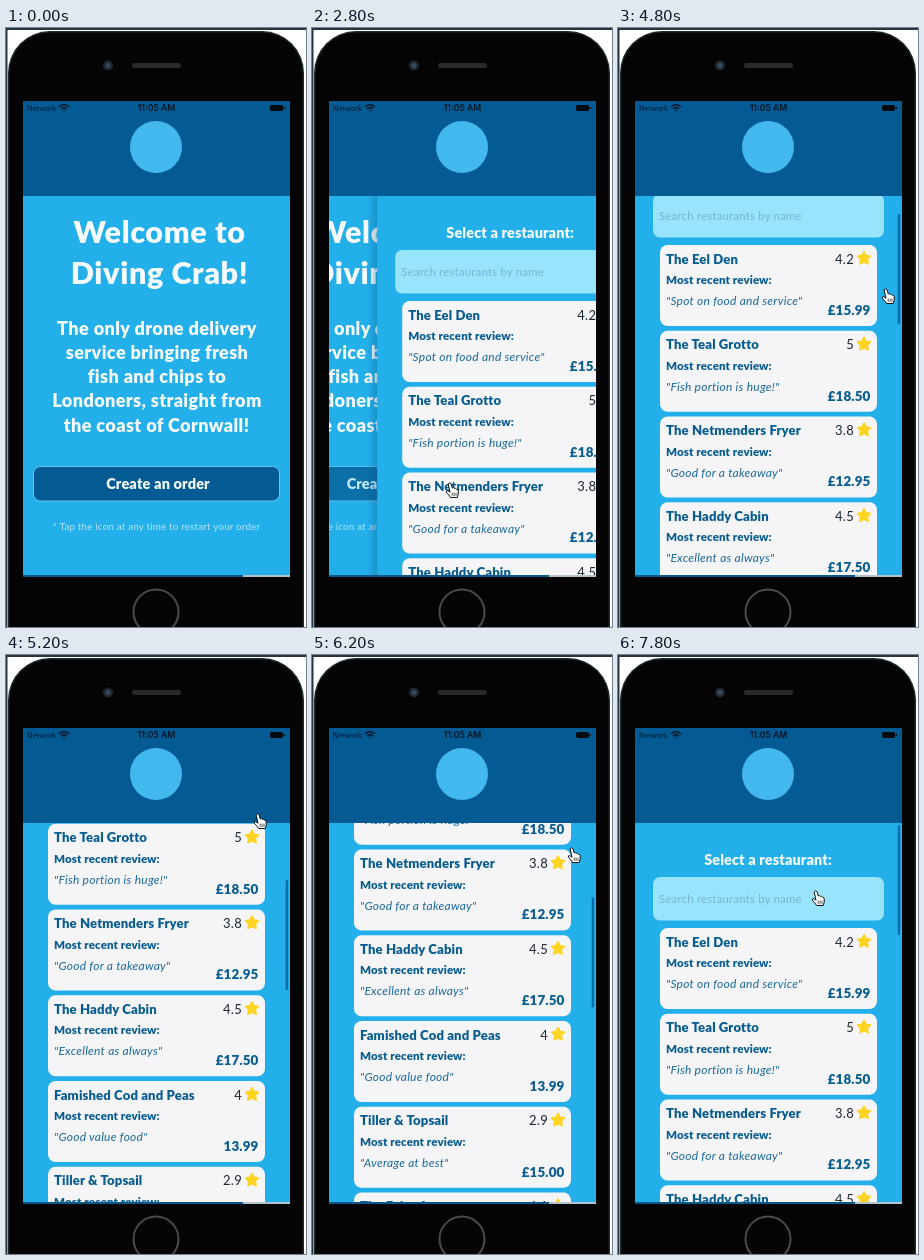
An HTML page that plays this animation: 300x599 px, repeating every 8000 ms.

```html
<!DOCTYPE html>
<html lang="en">
<head>
<meta charset="utf-8">
<title>Fish and chips order</title>
<style>
  html, body { margin: 0; width: 100%; height: 100%; overflow: hidden; background: #fff; }
  svg { display: block; width: 100%; height: 100%; }
  text { font-family: Lato, "Open Sans", sans-serif; letter-spacing: .02em; }
  .bold { font-weight: 900; letter-spacing: .01em; }
  .light { fill: #f6fbff; }
  .status { font-family: Inter, Roboto, sans-serif; font-size: 7.2px; letter-spacing: 0; fill: #06182a; }
  .mid { text-anchor: middle; }
  .end { text-anchor: end; }
  .h1 { font-size: 30.5px; }
  .lead { font-size: 18.1px; }
  .name { font-size: 13.1px; fill: #075c90; }
  .label { font-size: 11.5px; fill: #075c90; }
  .quote { font-size: 12px; font-style: italic; fill: #1a6a9c; }
  .price { font-size: 13.4px; fill: #075c90; }
  .rate { font-size: 13px; fill: #1c2630; }
</style>
</head>
<body>
<svg viewBox="0 0 300 599" preserveAspectRatio="none">
  <defs>
    <clipPath id="view"><rect x="17" y="168" width="267" height="379.5"/></clipPath>
    <linearGradient id="shade">
      <stop offset="0" stop-color="#04507f" stop-opacity="0"/>
      <stop offset="1" stop-color="#04507f" stop-opacity=".3"/>
    </linearGradient>
  </defs>

  <rect width="300" height="599" fill="#fff"/>
  <path d="M0 0H300V2H0Z" fill="#2a343f"/>
  <path d="M0 2H1.5V599H0Z" fill="#283541"/>
  <rect x="2" y="3" width="296" height="660" rx="42" fill="#1f2a2e"/>
  <rect x="3.4" y="4.4" width="293.2" height="657" rx="40.6" fill="#040405"/>
  <circle cx="102" cy="37.5" r="5" fill="#20272e"/>
  <circle cx="102" cy="37.5" r="2.6" fill="#34495c"/>
  <rect x="126" y="35" width="49" height="5" rx="2.5" fill="#2c2929"/>
  <circle cx="150" cy="584" r="22.5" fill="#050506" stroke="#4b4b4d" stroke-width="2"/>

  <rect x="17" y="73" width="267" height="476" fill="#23afea"/>
  <g clip-path="url(#view)">
    <g id="welcome">
      <g id="hello" class="bold light mid"></g>
      <g id="button">
        <rect x="27.5" y="438.5" width="246" height="34.5" rx="7" fill="#045a93" stroke="#6cc3ee"/>
        <text class="bold light mid" x="152" y="460.5" font-size="14.5">Create an order</text>
      </g>
      <text class="mid" x="150.5" y="501.5" font-size="9.8" fill="#b5e4fa">* Tap the icon at any time to restart your order</text>
    </g>
    <g id="shop">
      <rect x="7" y="168" width="10" height="380" fill="url(#shade)"/>
      <rect x="17" y="168" width="267" height="380" fill="#23afea"/>
      <g id="list">
        <text class="bold light mid" x="150" y="210" font-size="14.4">Select a restaurant:</text>
        <rect x="35" y="222" width="231" height="43.5" rx="7" fill="#98e4fc"/>
        <text x="41" y="248" font-size="11.35" fill="#76b5cf">Search restaurants by name</text>
      </g>
      <rect id="bar" x="279.7" width="2.4" rx="1.2" fill="#0a6ca6"/>
    </g>
  </g>

  <rect x="17" y="73" width="267" height="95" fill="#045a93"/>
  <circle cx="150" cy="119" r="26" fill="#43b8ef"/>
  <text class="status" x="21" y="83">Network</text>
  <g fill="none" stroke="#06182a" stroke-width="1.5">
    <path d="M53 79Q58 74.5 63 79M55 81Q58 78.2 61 81"/>
    <path d="M57.2 82.6H58.8"/>
  </g>
  <text class="status mid" x="150.5" y="83" font-weight="600" style="font-size:8.7px">11:05 AM</text>
  <rect x="264" y="77" width="13" height="6" rx="1.6" fill="#020a12"/>
  <rect x="277.7" y="79" width="1.2" height="2" fill="#020a12"/>
  <path d="M17 547H237V549H17Z" fill="#07598c"/>
  <path d="M237 547H284V549H237Z" fill="#b4c3cc"/>

  <path id="arrow" d="M0 0V13.5L3.2 10.6L5.3 15.6L7.8 14.5L5.7 9.7H10Z" fill="#050505" stroke="#fff" stroke-width="1"/>
  <g id="hand" stroke="#101010" stroke-linejoin="round" stroke-linecap="round">
    <path d="M-3.6 -6.4Q-2.2 -8.2 -.9 -6.2L.3 -2Q1.5 -3 2.5 -1.6Q3.7 -2.2 4.5 -.8Q6 -1 6.2 .8Q6.8 4 5.2 7.5H-1.4Q-3.2 4.6 -5.6 2.2Q-6 .4 -4.2 .6L-2.3 2Z" fill="#fff"/>
    <path d="M.2 3V5.5M2.1 3V5.5M4 3V5.5" fill="none" stroke-width=".7"/>
  </g>
</svg>
<script>
const LOOP = 8000, STEP = 200, ROW = 85.75;
const $ = id => document.getElementById(id);
const clamp = v => Math.min(1, Math.max(0, v));

function add(parent, tag, attrs, content = '') {
  const el = document.createElementNS('http://www.w3.org/2000/svg', tag);
  for (const k in attrs) el.setAttribute(k, attrs[k]);
  el.textContent = content;
  parent.append(el);
  return el;
}
const text = (parent, cls, x, y, str) => add(parent, 'text', { class: cls, x, y }, str);

['Welcome to', 'Diving Crab!'].forEach((s, i) => text($('hello'), 'h1', 153.5, 215 + i * 40.5, s));
['The only drone delivery', 'service bringing fresh', 'fish and chips to',
 'Londoners, straight from', 'the coast of Cornwall!']
  .forEach((s, i) => text($('hello'), 'lead', i < 4 ? 151 : 150.5, 306.5 + i * 24.3, s));

const star = Array.from({ length: 10 }, (_, i) => {
  const a = i * Math.PI / 5, r = i % 2 ? 3.9 : 7.4;
  return [r * Math.sin(a), -r * Math.cos(a)].map(v => v.toFixed(2));
}).join(' ');

[
  ['The Eel Den', '4.2', 'Spot on food and service', '£15.99'],
  ['The Teal Grotto', '5', 'Fish portion is huge!', '£18.50'],
  ['The Netmenders Fryer', '3.8', 'Good for a takeaway', '£12.95'],
  ['The Haddy Cabin', '4.5', 'Excellent as always', '£17.50'],
  ['Famished Cod and Peas', '4', 'Good value food', '13.99'],
  ['Tiller & Topsail', '2.9', 'Average at best', '£15.00'],
  ['The Brine Lantern', '4.1', 'Tasty and quick', '£14.50']
].forEach(([name, rate, quote, price], i) => {
  const g = add($('list'), 'g', { transform: `translate(42 ${273 + i * ROW})` });
  add(g, 'rect', { width: 217, height: 81, rx: 7.5, fill: '#f5f4f6' });
  text(g, 'bold name', 6, 18.5, name);
  text(g, 'bold label', 6, 39, 'Most recent review:');
  text(g, 'quote', 6, 60, `"${quote}"`);
  text(g, 'rate end', 194, 18.5, rate);
  text(g, 'bold price end', 210.5, 69.8, price);
  add(g, 'polygon', { points: star, transform: 'translate(204 13.4)', fill: '#fdd422',
    stroke: '#fdd422', 'stroke-linejoin': 'round' });
});

// Each key is [time, ...values]; values run linearly between keys.
const pointerKeys = [
  [1000, 205, 545], [1400, 139, 459], [2800, 140, 462], [3400, 140, 462], [4200, 268, 332],
  [4400, 270, 324], [4800, 270, 268], [5000, 262, 200], [5200, 254, 166], [5600, 253, 164],
  [6200, 262, 200], [7000, 280, 468], [7200, 278, 462], [7800, 200, 243]
];
const scrollKeys = [
  [4400, 0], [4800, 56], [5000, 126], [5200, 190], [5400, 230], [5600, 248],
  [6200, 250], [7000, -20], [7200, -8], [7400, 0]
];

function track(keys, t) {
  if (t <= keys[0][0]) return keys[0].slice(1);
  const i = keys.findIndex(k => k[0] >= t);
  if (i < 0) return keys[keys.length - 1].slice(1);
  const a = keys[i - 1], b = keys[i], p = (t - a[0]) / (b[0] - a[0]);
  return a.slice(1).map((v, j) => v + (b[j + 1] - v) * p);
}

function move(id, x, y) { $(id).setAttribute('transform', `translate(${x} ${y})`); }
function show(id, on) { $(id).style.display = on ? '' : 'none'; }

function draw(t) {
  const slide = 1 - (1 - clamp((t - 2500) / 690)) ** 3;
  move('welcome', -80 * slide, 0);
  move('shop', 267 * (1 - slide), 0);
  show('welcome', slide < 1);
  show('shop', slide > 0);
  $('button').setAttribute('opacity', t < 2400 ? 1 : .75);

  const [scroll] = track(scrollKeys, t);
  move('list', 0, -scroll);
  show('bar', t >= 4400);
  $('bar').setAttribute('y', 170 + Math.max(0, scroll) * .29);
  $('bar').setAttribute('height', 110 + Math.min(0, scroll));

  const [x, y] = track(pointerKeys, t), pressed = t >= 2400;
  show('arrow', t >= 1000 && !pressed);
  show('hand', pressed);
  move('arrow', x - 4, y - 8);
  move('hand', x, y);
}

function tick(now) {
  draw(Math.floor(now % LOOP / STEP) * STEP);
  requestAnimationFrame(tick);
}
draw(0);
requestAnimationFrame(tick);
</script>
</body>
</html>
```
